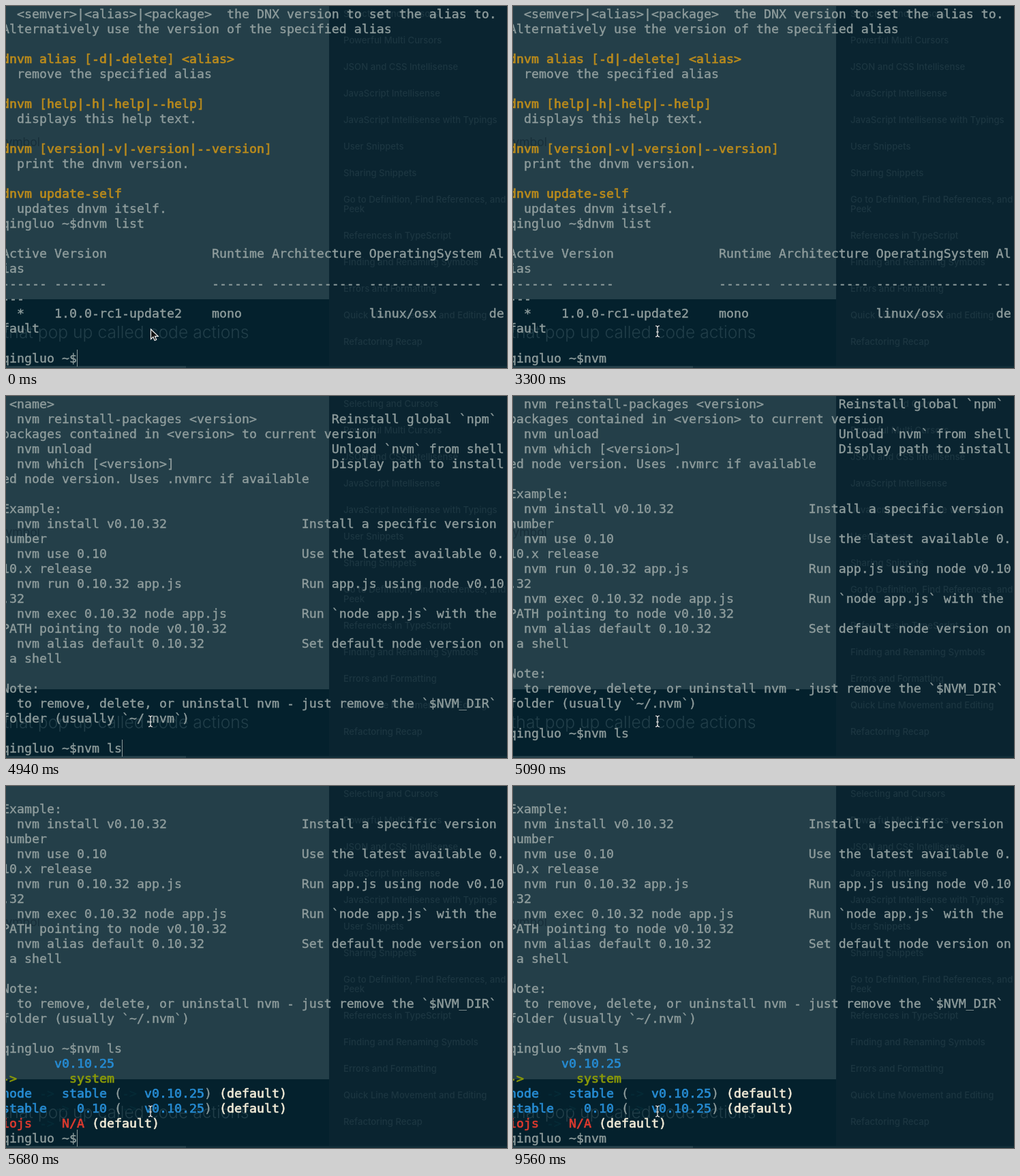
Animation, 735 px wide and 532 px high, one loop 9860 ms. Source, as an HTML page:

```html
<!DOCTYPE html>
<html lang="en">
<head>
<meta charset="utf-8">
<title>Terminal session</title>
<style>
  html, body { margin: 0; width: 100%; height: 100%; overflow: hidden; background: #04212d; }
  body { position: relative; }
  body > * { position: absolute; margin: 0; white-space: pre; }
  .page { left: 0; top: 0; width: 474px; height: 431px; background: #243f49; }
  .side { left: 474px; top: 0; width: 261px; height: 532px; background: #0a2430; }
  .edge { left: 0; top: 529px; width: 735px; height: 3px; background: linear-gradient(90deg, #243f49 264px, #112d38 264px); }
  .ghost { font-family: Inter, sans-serif; color: #1c3641; }
  .menu { left: 495px; font-size: 13.2px; font-weight: 500; line-height: 14px; }
  .symbol { right: 685px; top: 189px; font-size: 17.5px; line-height: 22px; color: #182f3a; }
  .caption { left: -3px; top: 464px; font-size: 24.7px; font-weight: 300; line-height: 30px; color: #213e49; }
  #term {
    left: -6px; top: 1px; color: #8e9c9c;
    font: 18.27px/22px "DejaVu Sans Mono", monospace;
    -webkit-text-stroke: .4px;
  }
  #term i { font-style: normal; -webkit-text-stroke-width: .7px; }
  .y { color: #b98a1c; } .b { color: #268bd2; } .g { color: #8a9a08; }
  .r { color: #dc3a2f; } .w { color: #eee8d5; } .d { color: #062a36; }
  #caret { top: 505px; width: 1px; height: 25px; background: #8e9c9c; }
  svg { left: 204px; top: 466px; }
</style>
</head>
<body>
<div class="page"></div>
<div class="side"></div>
<div class="edge"></div>
<div class="ghost symbol">symbol</div>
<div class="ghost caption">that pop up called code actions</div>
<pre id="term"></pre>
<div id="caret"></div>
<svg width="28" height="30">
  <defs><path id="bar" d="M5 4q3 0 3 2.5q0-2.5 3-2.5M8 6v12M5 20q3 0 3-2.5q0 2.5 3 2.5M6 13h4"/></defs>
  <path id="arrow" d="M8.5 9v14.5l3.4-3.2 2.2 5.2 2.6-1.1-2.2-5.1h4.7z" fill="#111" stroke="#eee" stroke-width="1.2"/>
  <g id="beam" fill="none">
    <use href="#bar" stroke="#12242c" stroke-width="2.6"/>
    <use href="#bar" stroke="#eee" stroke-width="1.2"/>
  </g>
</svg>
<script>
const $ = id => document.getElementById(id);
const prompt$ = 'qingluo ~$';
const LOOP = 9860;

// Joins text pieces, each number being the column where the next piece starts.
const row = (...parts) => parts.reduce((s, p) => typeof p === 'number' ? s.padEnd(p) : s + p, '');
const table = (...c) => row(c[0], 7, c[1], 28, c[2], 36, c[3], 49, c[4], 65, c[5]);
const dash = n => '-'.repeat(n);

// {x|text} colours a piece of text.
const versions = [
  '  <semver>|<alias>|<package>  the DNX version to set the alias to.',
  'Alternatively use the version of the specified alias',
  '',
  '{y|dnvm alias [-d|-delete] <alias>}',
  '  remove the specified alias',
  '',
  '{y|dnvm [help|-h|-help|--help]}',
  '  displays this help text.',
  '',
  '{y|dnvm [version|-v|-version|--version]}',
  '  print the dnvm version.',
  '',
  '{y|dnvm update-self}',
  '  updates dnvm itself.',
  prompt$ + 'dnvm list',
  '',
  table('Active', 'Version', 'Runtime', 'Architecture', 'OperatingSystem', 'Al'),
  'ias',
  table(dash(6), dash(7), dash(7), dash(12), dash(15), dash(2)),
  dash(3),
  table('  *', '1.0.0-rc1-update2', 'mono', '', 'linux/osx', 'de'),
  'fault',
  ''
];

const help = [
  ' <name>',
  row('  nvm reinstall-packages <version>', 44, 'Reinstall global `npm`'),
  'packages contained in <version> to current version',
  row('  nvm unload', 44, 'Unload `nvm` from shell'),
  row('  nvm which [<version>]', 44, 'Display path to install'),
  'ed node version. Uses .nvmrc if available',
  '',
  'Example:',
  row('  nvm install v0.10.32', 40, 'Install a specific version'),
  'number',
  row('  nvm use 0.10', 40, 'Use the latest available 0.'),
  '10.x release',
  row('  nvm run 0.10.32 app.js', 40, 'Run app.js using node v0.10'),
  '.32',
  row('  nvm exec 0.10.32 node app.js', 40, 'Run `node app.js` with the'),
  'PATH pointing to node v0.10.32',
  row('  nvm alias default 0.10.32', 40, 'Set default node version on'),
  ' a shell',
  '',
  'Note:',
  '  to remove, delete, or uninstall nvm - just remove the `$NVM_DIR`',
  'folder (usually `~/.nvm`)',
  ''
];

const resolved = '({d|->} {b|v0.10.25}) {w|(default)}';
const listing = [
  '       {b|v0.10.25}',
  '{g|->       system}',
  '{b|node} {d|->} {b|stable} ' + resolved,
  '{b|stable} {d|->} {b|0.10} ' + resolved,
  '{r|iojs} {d|->} {r|N/A} {w|(default)}'
];
const listed = n => [...help, prompt$ + 'nvm ls', ...listing.slice(0, n)];

// [start ms, lines above, typed text or null while a command runs, caret shown]
const steps = [
  [0, versions, '', 1], [600, versions, '', 0],
  [1200, versions, 'n', 1], [1350, versions, 'nv', 1], [1500, versions, 'nvm', 1],
  [2250, versions, 'nvm', 0], [2850, versions, 'nvm', 1], [3300, versions, 'nvm', 0],
  [3590, help, '', 1], [4190, help, '', 0],
  [4340, help, 'n', 1], [4490, help, 'nv', 1], [4640, help, 'nvm', 1],
  [4790, help, 'nvm l', 1], [4940, help, 'nvm ls', 1],
  [5090, listed(0), null, 0], [5240, listed(2), null, 0],
  [5380, listed(3), null, 0], [5530, listed(4), null, 0],
  [5680, listed(5), '', 1], [6430, listed(5), 'n', 1], [6580, listed(5), 'nv', 1],
  [6870, listed(5), 'nvm', 1], [7470, listed(5), 'nvm', 0], [7920, listed(5), 'nvm', 1],
  [8360, listed(5), 'nvm ', 1], [9560, listed(5), 'nvm ', 0]
];

const markup = s => s.replace(/</g, '&lt;').replace(/\{(\w)\|([^}]*)\}/g, '<i class="$1">$2</i>');

const menu = ['Selecting and Cursors', 'Powerful Multi Cursors', 'JSON and CSS Intellisense',
  'JavaScript Intellisense', 'JavaScript Intellisense with Typings', 'User Snippets', 'Sharing Snippets',
  'Go to Definition, Find References, and\nPeek', 'References in TypeScript', 'Finding and Renaming Symbols',
  'Errors and Formatting', 'Quick Line Movement and Editing', 'Refactoring Recap'];
menu.forEach((text, i) => {
  const item = document.createElement('div');
  item.className = 'ghost menu';
  item.textContent = text;
  item.style.top = 4 + i * 39 + (i > 7 ? 14 : 0) + 'px';
  document.body.insertBefore(item, $('term'));
});

let shown;
function draw(now) {
  const t = now % LOOP;
  const step = steps.findLast(s => s[0] <= t) || steps[0];
  if (step !== shown) {
    const [, lines, typed, caret] = shown = step;
    const last = typed === null ? '' : prompt$ + typed;
    $('term').innerHTML = [...lines, last].slice(-24).map(markup).join('\n');
    $('caret').style.left = 11 * last.length - 6 + 'px';
    $('caret').style.opacity = caret;
  }
  $('arrow').style.opacity = +(t < 750);
  $('beam').style.opacity = +(t >= 750);
  requestAnimationFrame(draw);
}
draw(performance.now());
</script>
</body>
</html>
```
